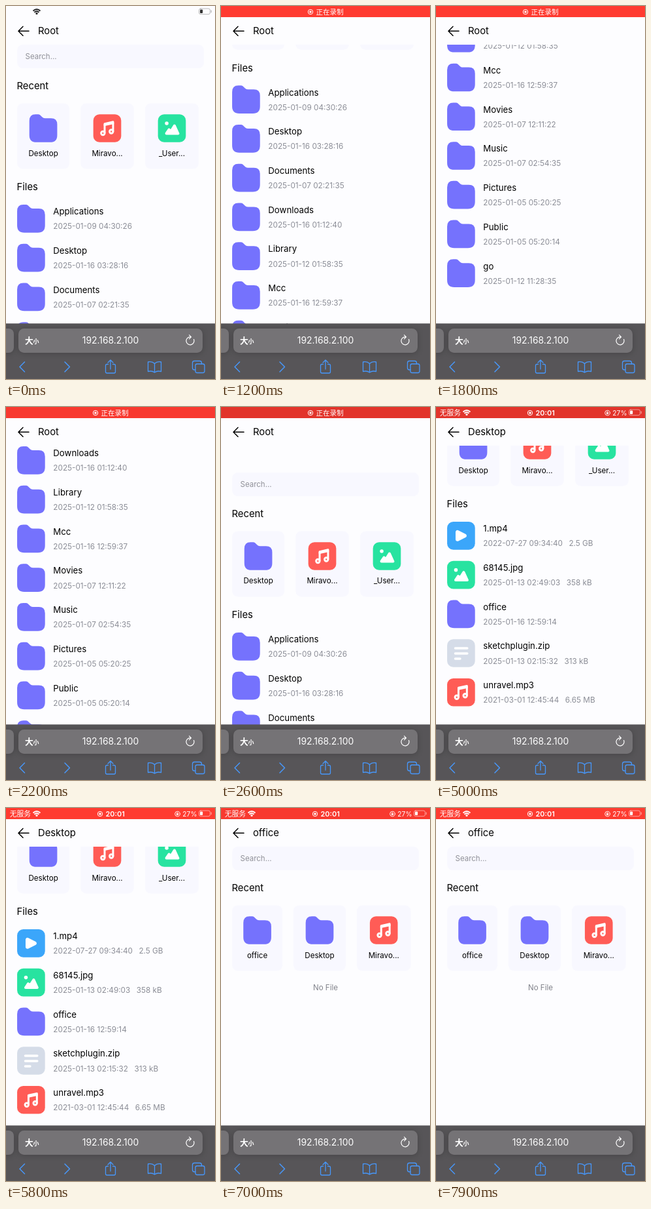
Animation, 320 px wide and 569 px high, one loop 8 s. Source, as an HTML page:

```html
<!DOCTYPE html>
<html lang="zh">
<head>
<meta charset="utf-8">
<style>
  html, body { margin: 0; width: 100%; height: 100%; overflow: hidden; background: #fdfdff; }
  svg { display: block; width: 100vw; height: 100vh; }
  text { font-family: Inter, "Noto Sans CJK SC", "Noto Sans CJK", sans-serif; white-space: pre; }
  .head { font-size: 14.8px; }
  .name { font-size: 13.25px; }
  .info { font-size: 11.75px; fill: #8b8d96; }
  .label { font-size: 11.6px; text-anchor: middle; }
  .hint { font-size: 11.5px; fill: #909198; }
  .empty { font-size: 11.5px; fill: #80828a; text-anchor: middle; }
  .line { fill: none; stroke-linecap: round; stroke-linejoin: round; }
  .field { fill: #757376; filter: drop-shadow(0 1px 4px rgba(0, 0, 0, .2)); }
</style>
</head>
<body>
<svg viewBox="0 0 320 569">
  <defs>
    <clipPath id="view"><rect y="59" width="320" height="426"/></clipPath>
    <g id="wifi" class="line" stroke-width="1.9" style="stroke-linecap:butt">
      <path d="M41.5 7.5Q47 2.6 52.5 7.5M43.5 9.7Q47 6.5 50.5 9.7"/>
      <circle cx="47" cy="11.4" r=".7"/>
    </g>
    <g id="battery">
      <rect class="line" x="295.5" y="4" width="17" height="8.6" rx="2.5" stroke-opacity=".5"/>
      <rect x="297" y="5.5" width="4.2" height="5.6" rx="1" stroke="none"/>
      <path d="M314.3 6.8v3" class="line" stroke-opacity=".6"/>
    </g>
    <g id="rec" fill="none" stroke="#fff">
      <circle r="3.7"/><circle r="1.8" fill="#fff" stroke="none"/>
    </g>
  </defs>

  <rect width="320" height="569" fill="#fdfdff"/>
  <g clip-path="url(#view)"><g id="pages"></g></g>

  <path class="line" d="M35 38.3H19M26 31.3l-7 7 7 7" stroke="#000" stroke-width="1.5"/>
  <text id="title" class="head" x="49" y="43.3"></text>

  <g fill="#222" stroke="#222"><use href="#wifi"/></g>
  <g fill="#333" stroke="#777"><use href="#battery"/></g>
  <g id="status">
    <rect id="bar" width="320" height="17"/>
    <g id="recording" fill="#fff">
      <use href="#rec" x="137" y="9"/>
      <text x="145.5" y="12.7" font-size="10.5">正在录制</text>
    </g>
    <g id="clock" fill="#fff">
      <text x="5.7" y="12.7" font-size="10.8">无服务</text>
      <g stroke="#fff"><use href="#wifi"/><use href="#battery"/></g>
      <use href="#rec" x="144" y="9"/>
      <text x="152.5" y="12.8" font-size="10.9" font-weight="600">20:01</text>
      <g class="line" stroke="#fff" stroke-width=".9"><circle cx="262.5" cy="9" r="3.8"/><path d="M261.5 8.5v-1q1-1.200 2 0v1"/></g>
      <rect x="261" y="8.5" width="3" height="2.5"/>
      <text x="270.3" y="12.7" font-size="10.3">27%</text>
    </g>
  </g>

  <rect y="484.3" width="320" height="85" fill="#575558"/>
  <rect class="field" x="-20" y="492" width="32" height="37" rx="8"/>
  <rect class="field" x="19" y="492" width="282" height="37" rx="8.5"/>
  <g fill="#fff">
    <text x="29" y="515" font-size="12.8" font-weight="700">大</text>
    <text x="41.5" y="515" font-size="9" font-weight="700">小</text>
    <text x="160" y="515.3" font-size="13.9" text-anchor="middle">192.168.2.100</text>
  </g>
  <path class="line" d="M287.5 508.5A6 6 0 1 1 282 504.8h1M280.5 501.8l3 3-3 3" stroke="#fff" stroke-width="1.2"/>
  <g class="line" stroke="#4797fa" stroke-width="1.3">
    <path d="M28.5 543l-7.5 7.5 7.5 7.5M90 543l7.5 7.5-7.5 7.5" stroke-width="1.5"/>
    <path d="M156.5 546.5h-2q-2 0-2 2v9.500q0 2 2 2h11q2 0 2-2v-9.500q0-2-2-2h-2M160 554v-13.500M156 544l4-4 4 4"/>
    <path d="M227.5 545.5q-4-4-10-2.500v14.500q6-1.500 10 1.500 4-3 10-1.500v-14.500q-6-1.500-10 2.500v13.500"/>
    <rect x="290" y="546" width="14" height="13.5" rx="2.5"/>
    <path d="M290 555h-1.500q-3 0-3-3v-7.500q0-3 3-3h8q3 0 3 3v1.500"/>
  </g>
</svg>

<script>
const $ = id => document.getElementById(id);
const LOOP = 8000, UNIT = 320 / 375, ICON = 50 * UNIT, ROW = 70 * UNIT, LEFT = 20 * UNIT;

// Icons are drawn on a 43-unit grid
const tile = color => `<rect width="43" height="43" rx="9.5" fill="${color}"/>`;
const icons = {
  folder: `<path fill="#7572fd" d="M0 10Q0 0 9.5 0H13.5C18.500 0 18.500 6 24.500 6H33.500Q43 6 43 15.500V32Q43 43 32 43H11Q0 43 0 32Z"/>`,
  music: tile('#ff5c56') + `<g class="line" stroke="#fff" stroke-width="3">
    <path d="M17.500 28.500V14.500L30.500 11.700V26"/><path d="M17.500 16.500L30.500 13.700"/>
    <circle cx="14.800" cy="29" r="2.700"/><circle cx="27.800" cy="26.500" r="2.700"/></g>`,
  image: tile('#27e3a0') + `<g fill="#fff"><circle cx="13.500" cy="14" r="2.800"/>
    <path class="line" style="fill:#fff" stroke="#fff" stroke-width="4" d="M13 29.500L17 23.500l3 2.500L25.500 17.500 31 29.500Z"/></g>`,
  video: tile('#3ba6fa') + `<path fill="#fff" stroke="#fff" stroke-width="6" stroke-linejoin="round" d="M16 16V27L27 21.500Z"/>`,
  zip: tile('#d5dce8') + `<path class="line" stroke="#fff" stroke-width="3.500" d="M12.500 14H31M12.500 22H31M12.500 30H20"/>`
};

const text = (cls, x, y, s) => `<text class="${cls}" x="${x}" y="${y}">${s}</text>`;
const icon = (kind, x, y) => `<g transform="translate(${x} ${y}) scale(${ICON / 43})">${icons[kind]}</g>`;

const card = ([kind, label, x, w]) =>
  `<rect x="${x}" y="148.5" width="${w}" height="100" rx="8.5" fill="#f8f8ff"/>` +
  icon(kind, x + (w - ICON) / 2, 165.2) + text('label', x + w / 2, 228.5, label);

const row = ([name, date, kind = 'folder', size = ''], i) => {
  const y = 303 + i * ROW;
  return icon(kind, LEFT, y) + text('name', 72.3, y + 15.2, name) +
    text('info', 72.3, y + 37.3, date + (size && `<tspan dx="9.5">${size}</tspan>`));
};

const page = (cards, files) => `<g>
  <rect x="${LEFT}" y="59" width="286" height="36" rx="8.5" fill="#f8f8ff"/>
  ${text('hint', 29.5, 81.2, 'Search...')}${text('head', 16.5, 126.8, 'Recent')}${cards.map(card).join('')}
  ${files.length ? text('head', 16.5, 281.3, 'Files') + files.map(row).join('')
    : text('empty', 160, 278, 'No File')}</g>`;

const recent = [['folder', 'Desktop', LEFT, 80], ['music', 'Miravo...', 114.3, 81.4], ['image', '_User...', 213, 82]];
const rootFiles = [
  ['Applications', '2025-01-09 04:30:26'], ['Desktop', '2025-01-16 03:28:16'],
  ['Documents', '2025-01-07 02:21:35'], ['Downloads', '2025-01-16 01:12:40'],
  ['Library', '2025-01-12 01:58:35'], ['Mcc', '2025-01-16 12:59:37'],
  ['Movies', '2025-01-07 12:11:22'], ['Music', '2025-01-07 02:54:35'],
  ['Pictures', '2025-01-05 05:20:25'], ['Public', '2025-01-05 05:20:14'],
  ['go', '2025-01-12 11:28:35']
];
const desktopFiles = [
  ['1.mp4', '2022-07-27 09:34:40', 'video', '2.5 GB'],
  ['68145.jpg', '2025-01-13 02:49:03', 'image', '358 kB'],
  ['office', '2025-01-16 12:59:14'],
  ['sketchplugin.zip', '2025-01-13 02:15:32', 'zip', '313 kB'],
  ['unravel.mp3', '2021-03-01 12:45:44', 'music', '6.65 MB']
];
const officeRecent = [['folder', 'office', LEFT, 77], ['folder', 'Desktop', 111, 80], ['music', 'Miravo...', 208, 82.5]];

$('pages').innerHTML = page(recent, rootFiles) + page(recent, desktopFiles) + page(officeRecent, []);
const pages = [...$('pages').children];
const titles = ['Root', 'Desktop', 'office'];

// Scroll offsets over time, including the rubber-band overshoot
const scroll = [[0, 0], [800, 0], [1800, 514], [2100, 477], [2600, -41], [3200, 0],
  [4400, 0], [5000, 128], [5400, 118], [6600, 118], [6600, 0], [LOOP, 0]];

const ease = (t, a, b) => {
  const p = Math.min(1, Math.max(0, (t - a) / (b - a)));
  return p * p * (3 - 2 * p);
};
const offset = t => {
  const i = scroll.findIndex(k => k[0] > t), [a, from] = scroll[i - 1], [b, to] = scroll[i];
  return from + (to - from) * ease(t, a, b);
};

function draw() {
  const t = (performance.now() - start) % LOOP;
  const current = t < 4100 ? 0 : t < 6600 ? 1 : 2;
  pages.forEach((p, i) => p.style.display = i === current ? '' : 'none');
  pages[current].setAttribute('transform', `translate(0 ${-offset(t)})`);
  $('title').textContent = titles[current];

  // The recording bar darkens once every 2.4 s
  const dim = Math.max(0, Math.cos((t - 200) / 2400 * 2 * Math.PI)) ** 2;
  $('bar').setAttribute('fill', `rgb(${255 - 29 * dim},${59 - 7 * dim},${48 - 5 * dim})`);
  $('status').style.opacity = ease(t, 100, 600);
  const swap = ease(t, 3000, 3300);
  $('recording').style.opacity = 1 - swap;
  $('clock').style.opacity = swap;
  requestAnimationFrame(draw);
}
const start = performance.now();
draw();
</script>
</body>
</html>
```
